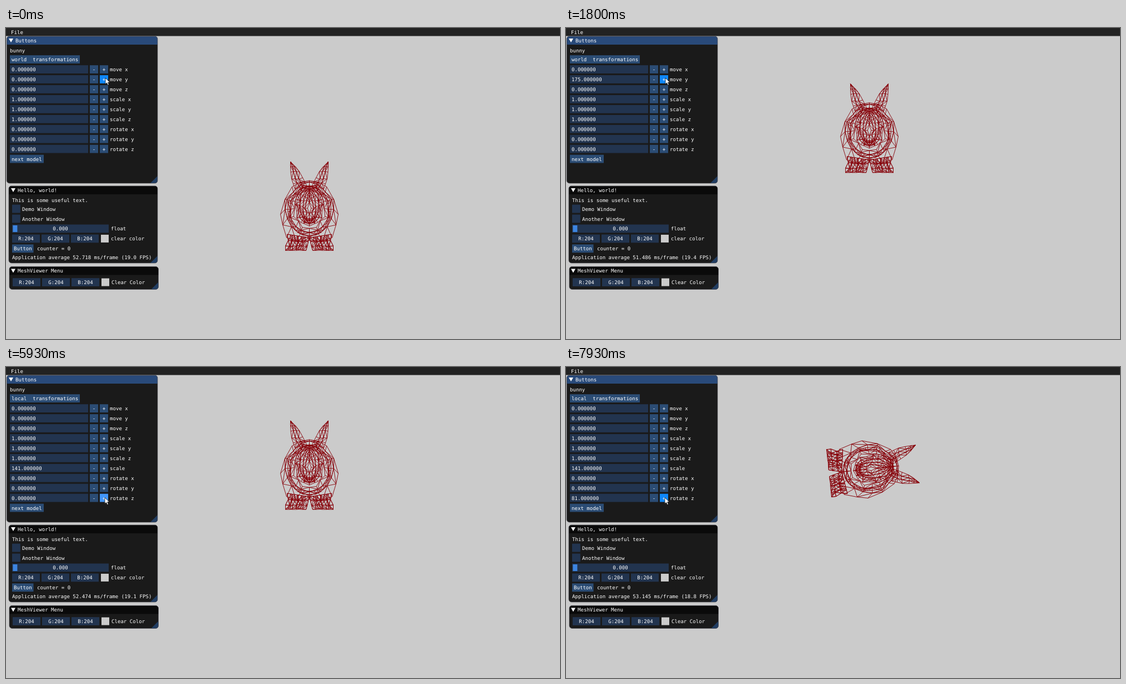
An HTML page that plays this animation: 998 by 561 pixels, repeating every 8000 ms.

```html
<!DOCTYPE html>
<html lang="en">
<head>
<meta charset="utf-8">
<title>Mesh viewer</title>
<style>
  html, body { margin: 0; width: 100%; height: 100%; overflow: hidden; background: #cbcbcb; }
  svg { display: block; width: 998px; height: 561px; }
  text {
    font: 9.09px "DejaVu Sans Mono", monospace;
    fill: #fff;
    white-space: pre;
    text-rendering: geometricPrecision;
  }
</style>
</head>
<body>
<svg id="stage" viewBox="0 0 998 561"></svg>
<script>
const LOOP = 8000, FPS = 15, SCALE = 998 / 1280;
const BUTTON = '#2b4c74', HOVER = '#4296fa', ACTIVE = '#0f87fa', FIELD = '#22344f';
const stage = document.getElementById('stage');

function el(parent, tag, attrs, content) {
  const node = document.createElementNS('http://www.w3.org/2000/svg', tag);
  for (const key in attrs) node.setAttribute(key, attrs[key]);
  if (content !== undefined) node.textContent = content;
  return parent.appendChild(node);
}
const label = (g, x, cy, str, anchor = 'start') =>
  el(g, 'text', { x, y: cy + 3.1, 'text-anchor': anchor }, str);
const box = (g, x, cy, width, fill) =>
  el(g, 'rect', { x, y: cy - 7.8, width, height: 14.8, fill });

// ---- wireframe, right half mirrored to the left ----
let seed = 11;
const jitter = amount => {
  seed = (seed * 16807) % 2147483647;
  return (seed / 2147483647 - 0.5) * 2 * amount;
};

function buildMesh() {
  let d = '';
  const line = (a, b) => {
    for (const s of [1, -1]) {
      d += `M${(s * a[0]).toFixed(1)} ${a[1].toFixed(1)}L${(s * b[0]).toFixed(1)} ${b[1].toFixed(1)}`;
    }
  };
  const strip = (A, B) => A.forEach((a, i) => {
    line(a, B[i]);
    if (i + 1 === A.length) return;
    line(a, A[i + 1]);
    line(B[i], B[i + 1]);
    if (i % 2) line(a, B[i + 1]); else line(A[i + 1], B[i]);
  });
  const strips = lines => lines.slice(1).forEach((b, i) => strip(lines[i], b));
  const arc = (rx, ry, cy, n, rough = 2.5) => Array.from({ length: n }, (_, i) => {
    const a = Math.PI * i / (n - 1), inner = i > 0 && i < n - 1;
    return [rx * Math.sin(a) + (inner ? jitter(rough) : 0), cy - ry * Math.cos(a) + jitter(rough)];
  });
  const grid = (A, B, k) => strips(Array.from({ length: k + 1 }, (_, j) =>
    A.map((a, i) => {
      const u = j / k, amount = j > 0 && j < k && i > 0 ? 1.8 : 0;
      return [a[0] + (B[i][0] - a[0]) * u + jitter(amount),
              Math.min(73, a[1] + (B[i][1] - a[1]) * u + jitter(amount))];
    })));

  const outline = [[0, -53], [16, -50], [31, -42], [44, -19], [52, 8], [48, 27], [41, 50], [24, 56], [0, 55]];
  strips([outline, arc(44, 47, -1, 9), arc(36, 42, 0, 9), arc(29, 36, -4, 9)]);
  strips([arc(38, 46, 1, 13), arc(33, 40, 1, 13)]);
  grid(arc(1, 24, -4, 9), arc(24, 33, -8, 9), 4);
  strips([arc(26, 35, -8, 11), arc(17, 26, -10, 11)]);
  const earOut = [[34, -87], [34, -79], [33.5, -68], [32, -56], [29, -47], [26, -38]];
  const earIn = [[34, -87], [24, -77], [18, -69], [12, -58], [8, -50], [4, -42]];
  grid(earOut, earIn, 3);
  const footOut = [[40, 44], [38, 55], [43, 65], [43, 73]];
  const footIn = [[1, 50], [2, 57], [4, 66], [6, 73]];
  grid(footOut, footIn, 6);
  grid(footOut, footIn, 4);
  return d;
}
const bunny = el(stage, 'path', { d: buildMesh(), fill: 'none', stroke: '#860008', 'stroke-width': 0.9 });

// ---- windows ----
function panel(x, y, w, h, title, titleX, titleFill) {
  const g = el(stage, 'g', {});
  el(g, 'rect', { x, y, width: w, height: h, rx: 5, fill: '#1a1a1a' });
  el(g, 'path', { d: `M${x} ${y + 15}v-10q0-5 5-5h${w - 10}q5 0 5 5v10z`, fill: titleFill });
  el(g, 'path', { d: `M${x + w} ${y + h - 13}v8q0 5-5 5h-8z`, fill: '#213d62' });
  el(g, 'rect', { x, y, width: w, height: h, rx: 5, fill: 'none', stroke: '#45454c', 'stroke-width': 0.7 });
  el(g, 'path', { d: `M${titleX - 12} ${y + 4}h8l-4 7z`, fill: '#fff' });
  label(g, titleX, y + 7.4, title);
  return g;
}
function colorRow(g, x, cy, name) {
  ['R', 'G', 'B'].forEach((c, i) => {
    box(g, x + i * 53, cy, 50, FIELD);
    label(g, x + i * 53 + 25, cy, c + ':204', 'middle');
  });
  el(g, 'rect', { x: x + 160, y: cy - 7.4, width: 14, height: 14, fill: '#cbcbcb' });
  label(g, x + 178, cy, name);
}

el(stage, 'rect', { width: 998, height: 14.5, fill: '#222' });
label(stage, 9, 7.8, 'File');

const main = panel(1.3, 15, 271.7, 265, 'Buttons', 17, '#294a7a');
label(main, 7, 41.3, 'bunny');

function transforms(space, names) {
  const g = el(main, 'g', {}), buttons = [], values = {};
  const button = (x, cy, w) => {
    buttons.push({ node: box(g, x, cy, w, BUTTON), x, cy, w });
  };
  button(7, 57, 126);
  label(g, 10, 57, space + '  transformations');
  names.forEach((name, i) => {
    const cy = 75 + i * 17.94;
    box(g, 7, cy, 141, FIELD);
    values[name] = label(g, 10, cy, /scale /.test(name) ? '1.000000' : name === 'scale' ? '141.000000' : '0.000000');
    button(151, cy, 15);
    button(169, cy, 15);
    label(g, 158.5, cy, '-', 'middle');
    label(g, 176.5, cy, '+', 'middle');
    label(g, 187, cy, name);
  });
  const last = 75 + names.length * 17.94;
  button(7, last, 61);
  label(g, 10, last, 'next model');
  return { g, buttons, values };
}
const axes = kind => ['x', 'y', 'z'].map(a => kind + ' ' + a);
const world = transforms('world', [...axes('move'), ...axes('scale'), ...axes('rotate')]);
const local = transforms('local', [...axes('move'), ...axes('scale'), 'scale', ...axes('rotate')]);

const hello = panel(5, 285, 268, 139, 'Hello, world!', 21, '#0a0a0a');
label(hello, 11, 311, 'This is some useful text.');
box(hello, 11, 326.5, 14.8, FIELD);
label(hello, 29, 326.5, 'Demo Window');
box(hello, 11, 344.4, 14.8, FIELD);
label(hello, 29, 344.4, 'Another Window');
box(hello, 11, 362.3, 174, FIELD);
el(hello, 'rect', { x: 12.4, y: 356, width: 8, height: 12, fill: '#3d85e0' });
label(hello, 98, 362.3, '0.000', 'middle');
label(hello, 189, 362.3, 'float');
colorRow(hello, 11, 380.3, 'clear color');
box(hello, 11, 398.2, 38.5, BUTTON);
label(hello, 14, 398.2, 'Button');
label(hello, 56, 398.2, 'counter = 0');
const stats = label(hello, 11, 414, '');

const menu = panel(6, 430.5, 268.5, 41, 'MeshViewer Menu', 21, '#0a0a0a');
colorRow(menu, 12, 459, 'Clear Color');

const cursor = el(stage, 'path', {
  d: 'M0 0V11.2L2.6 8.8 4.4 13 6.4 12.1 4.6 8.1H8.2Z',
  fill: '#fff', stroke: '#000', 'stroke-width': 0.7
});

// ---- motion ----
const pointerPath = [
  [0, 179, 90], [2070, 179, 90], [2500, 68, 56.5], [4200, 68, 56.5], [4330, 64, 65],
  [4730, 178, 186], [4930, 178, 186], [5200, 178, 235.5], [LOOP, 178, 235.5]
];
const frameCost = [
  [0, 52.718], [1067, 51.894], [1800, 51.486], [2933, 51.749],
  [4800, 52.306], [6733, 52.592], [7933, 53.145], [LOOP, 53.17]
];
const presses = [[0, 1930], [3130, 3230], [6450, LOOP]];
const LOCAL_FROM = 3230;

const smooth = u => u * u * (3 - 2 * u);
function sample(track, t, ease = u => u) {
  const i = Math.max(1, track.findIndex(key => key[0] >= t));
  const a = track[i - 1], b = track[i];
  const u = ease((t - a[0]) / (b[0] - a[0]));
  return a.slice(1).map((v, k) => v + (b[k + 1] - v) * u);
}

function render(t) {
  const [px, py] = sample(pointerPath, t, smooth);
  const [ms] = sample(frameCost, t);
  const moves = Math.min(37, Math.floor(t / 1000 * 19.5));
  const turns = Math.floor((t / 1000 - 6.51) * 19.17);
  // the model runs one step ahead of the shown value
  const lift = moves ? Math.min(185, 5 * (moves + 1)) : 0;
  const angle = turns >= 0 ? 3 * (turns + 1) : 0;

  bunny.setAttribute('transform', `translate(546.5 ${328.2 - lift * SCALE}) rotate(${angle})`);
  cursor.setAttribute('transform', `translate(${px} ${py})`);
  world.values['move y'].textContent = (5 * moves).toFixed(6);
  local.values['rotate z'].textContent = (3 * Math.max(0, turns)).toFixed(6);
  stats.textContent = `Application average ${ms.toFixed(3)} ms/frame (${(1000 / ms).toFixed(1)} FPS)`;

  const current = t < LOCAL_FROM ? world : local;
  for (const space of [world, local]) space.g.setAttribute('display', space === current ? 'inline' : 'none');
  const pressed = presses.some(([from, to]) => t >= from && t < to);
  for (const { node, x, cy, w } of current.buttons) {
    const over = px >= x && px <= x + w && Math.abs(py - cy) <= 7.4;
    node.setAttribute('fill', over ? (pressed ? ACTIVE : HOVER) : BUTTON);
  }
}

function tick() {
  const t = (performance.now() + 5) % LOOP;
  render(Math.floor(t * FPS / 1000) * 1000 / FPS);
  requestAnimationFrame(tick);
}
tick();
</script>
</body>
</html>
```
